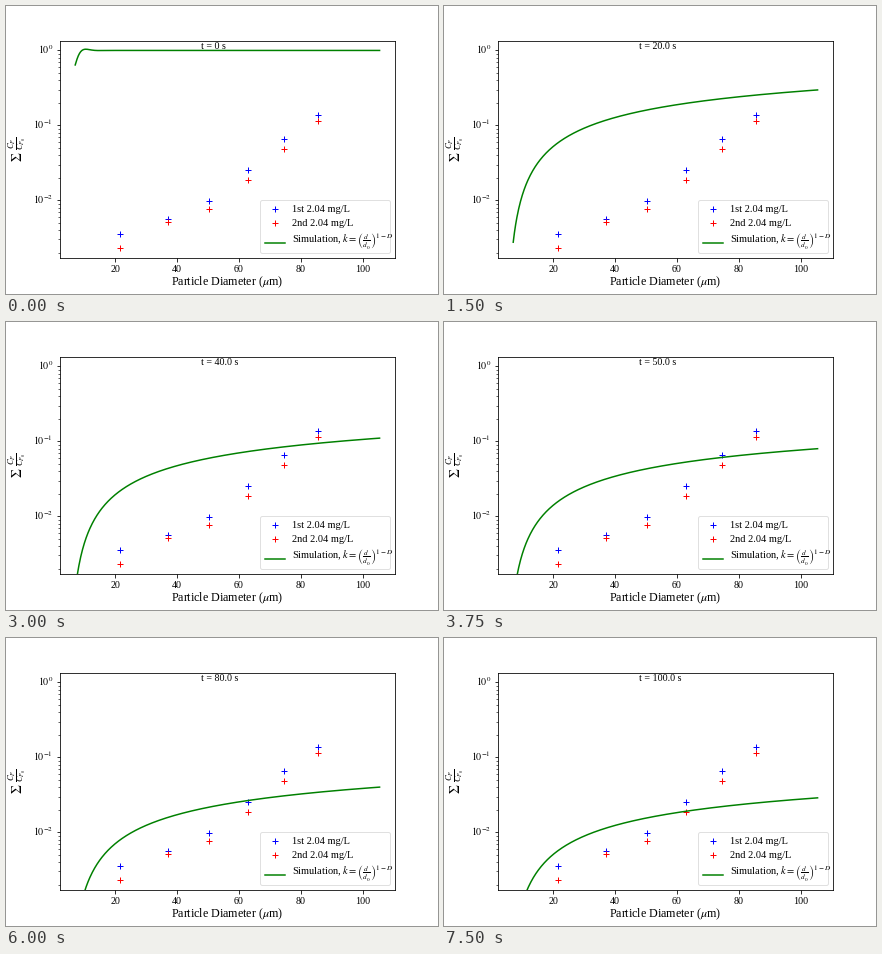
Recreate the animation shown at these times as a matplotlib script. Size 432 px wide and 288 px high, loop 8000 ms.

```python
import numpy as np
import matplotlib.pyplot as plt
from matplotlib.animation import FuncAnimation
from matplotlib.patches import FancyBboxPatch
from matplotlib.ticker import NullFormatter

plt.rcParams.update({
    "font.family": "Liberation Serif",
    "mathtext.fontset": "stix",
    "font.size": 10,
    "axes.labelsize": 12,
    "figure.subplot.bottom": 0.125,
    "figure.subplot.top": 0.88,
})

W, H = 432, 288
INTERVAL = 250   # ms per frame
HOLD = 3         # frames per time step
FRAMES = 32
STEP = 10.0      # simulated seconds per time step

D_MIN, D_MAX = 7.06, 105.5
D_REF = 4.8
d = np.linspace(D_MIN, D_MAX, 500)


def concentration(t):
    """Remaining fraction of particles by diameter at time t."""
    if t == 0:
        u = d - D_MIN
        return 1 - 0.36 * np.exp(-0.58 * u) * np.cos(0.72 * u)
    shape = (np.log(d / D_REF) / np.log(D_MAX / D_REF)) ** 2.25
    return 29.4 / (t + 1.4) ** 1.5 * shape


fig, ax = plt.subplots(figsize=(W / 72, H / 72), dpi=72)
ax.set_yscale("log")

# Two measured runs, six diameters each
sizes = [21.7, 37.0, 50.4, 62.8, 74.6, 85.6]
first = [0.0035, 0.00556, 0.00966, 0.0252, 0.0648, 0.136]
second = [0.0023, 0.00517, 0.00755, 0.0187, 0.048, 0.114]
ax.plot(sizes, first, "b+")
ax.plot(sizes, second, "r+")
curve, = ax.plot(d, concentration(0), "g-")
clock = ax.text(0.42, 0.96, "", transform=ax.transAxes)

ax.set_xlim(2.14, 110.42)
ax.set_ylim(10 ** -2.771, 10 ** 0.1319)
ax.set_xlabel(r"Particle Diameter ($\mu$m)", labelpad=0.5)
ax.yaxis.set_major_formatter(NullFormatter())

# Overlay in pixels, y downwards, for the labels and the legend
stage = fig.add_axes([0, 0, 1, 1])
stage.set(xlim=(0, W), ylim=(H, 0))
stage.axis("off")

for power in range(3):
    stage.text(47, 48.5 + 74.9 * power, f"$10^{{{-power}}}$", ha="right")

side = dict(rotation=90, ha="center", va="center")
stage.text(12, 151, r"$\Sigma$", fontsize=14, **side)
stage.text(12, 137.5, r"$\frac{C_P}{C_{P_0}}$", fontsize=12, **side)

stage.add_patch(FancyBboxPatch(
    (256.5, 196.5), 126, 49, boxstyle="round,pad=2,rounding_size=2",
    fc="white", ec="0.88", lw=1))


def legend_row(baseline, label, handle_y, xs, style):
    stage.plot(xs, [handle_y] * len(xs), style)
    stage.text(285.5, baseline, label, fontsize=10.4)


legend_row(205.5, "1st 2.04 mg/L", 202.5, [268.5], "b+")
legend_row(219.5, "2nd 2.04 mg/L", 216.5, [268.5], "r+")
legend_row(236.5, r"Simulation, $k=\left(\frac{d}{d_0}\right)^{1-D}$",
           237, [258.5, 278.5], "g-")


def update(frame):
    t = frame // HOLD * STEP
    curve.set_ydata(concentration(t))
    clock.set_text(f"t = {t} s" if t else "t = 0 s")
    return curve, clock


anim = FuncAnimation(fig, update, frames=FRAMES, interval=INTERVAL)
plt.show()
```
